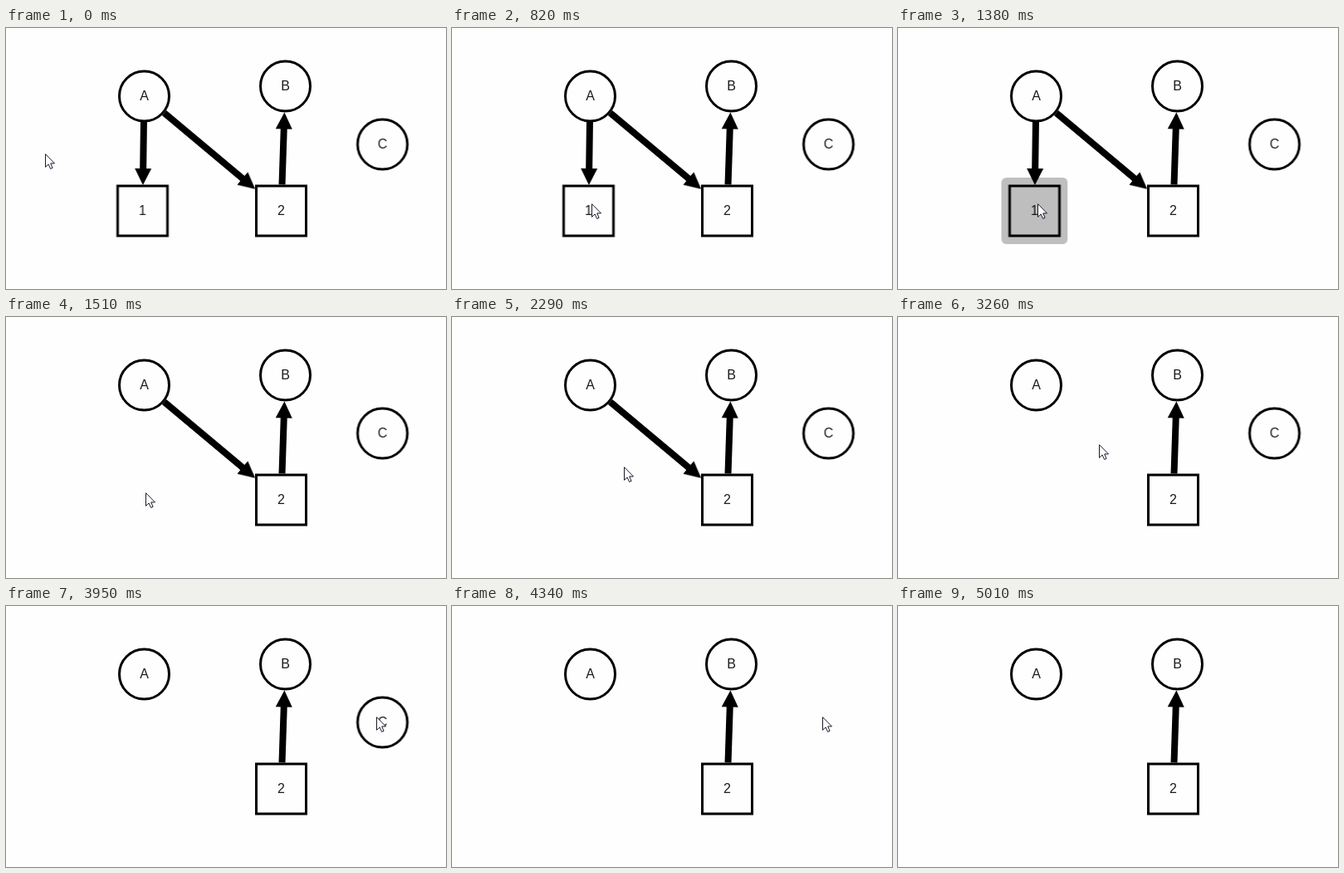
Recreate the animation shown at these times as an HTML page. Size 530 px wide and 314 px high, loop 5390 ms.

```html
<!DOCTYPE html>
<html lang="en">
<head>
<meta charset="utf-8">
<title>Deleting graph elements</title>
<style>
  html, body { margin: 0; width: 100%; height: 100%; overflow: hidden; background: #fefefe; }
  svg { display: block; width: 530px; height: 314px; }
  text { font: 16px "Liberation Sans", Arial, sans-serif; text-anchor: middle; fill: #1c1c1c; }
  .shape { fill: #fefefe; stroke: #000; stroke-width: 3; }
  .overlay { opacity: 0; }
  .overlay, .timed, .cursor { animation: 5390ms step-end infinite; }

  .node1 { animation-name: drop-node1; }
  .edge2 { animation-name: drop-edge2; }
  .nodeC { animation-name: drop-nodeC; }
  .node1 .overlay { animation-name: select-node1; }
  .edge2 .overlay { animation-name: select-edge2; }
  .nodeC .overlay { animation-name: select-nodeC; }
  .cursor { animation-name: move; }

  @keyframes drop-node1 { 0% { opacity: 1 } 28.014%, 100% { opacity: 0 } }
  @keyframes drop-edge2 { 0% { opacity: 1 } 60.482%, 100% { opacity: 0 } }
  @keyframes drop-nodeC { 0% { opacity: 1 } 80.519%, 100% { opacity: 0 } }
  @keyframes select-node1 { 0% { opacity: 0 } 25.602%, 100% { opacity: .25 } }
  @keyframes select-edge2 { 0% { opacity: 0 } 54.916%, 100% { opacity: .25 } }
  @keyframes select-nodeC { 0% { opacity: 0 } 78.293%, 100% { opacity: .25 } }

  @keyframes move {
    0% { transform: translate(47px, 151px) }
    10.204% { transform: translate(94px, 174px) }
    12.615% { transform: translate(138px, 194px) }
    15.213% { transform: translate(168px, 211px) }
    42.486% { transform: translate(207px, 180px) }
    45.083% { transform: translate(221px, 171px) }
    47.309% { transform: translate(236px, 159px) }
    49.721% { transform: translate(242px, 153px) }
    66.048% { transform: translate(283px, 149px) }
    68.274% { transform: translate(376px, 139px) }
    70.686% { transform: translate(443px, 133px) }
    73.283% { transform: translate(446px, 133px) }
    85.714% { transform: translate(450px, 153px) }
    88.311% { transform: translate(470px, 212px) }
    90.538% { transform: translate(498px, 298px) }
    92.949%, 100% { transform: translate(520px, 330px) }
  }
</style>
</head>
<body>
<svg viewBox="0 0 530 314">
  <defs>
    <circle id="round" class="shape" r="30"/>
    <rect id="square" class="shape" x="-30" y="-30" width="60" height="60"/>
    <rect id="glow" x="-40" y="-40" width="80" height="80" rx="6"/>
    <path id="head" d="M0 0L-20 -10V10Z"/>
  </defs>

  <!-- Edges: each group has its origin at the arrow tip, pointing along +x -->
  <g class="timed node1" transform="translate(164.9 189) rotate(90.8)">
    <path d="M-76 0H-15" stroke="#000" stroke-width="8"/>
    <use href="#head"/>
  </g>
  <g class="timed edge2" transform="translate(300.2 193.8) rotate(39.9)">
    <path class="overlay" d="M-143 0H-15" stroke="#000" stroke-width="28" stroke-linecap="round"/>
    <path d="M-143 0H-15" stroke="#000" stroke-width="8"/>
    <use href="#head"/>
  </g>
  <g transform="translate(335.4 101.5) rotate(-88.1)">
    <path d="M-87 0H-15" stroke="#000" stroke-width="8"/>
    <use href="#head"/>
  </g>

  <!-- Nodes -->
  <g transform="translate(166.5 82)"><use href="#round"/><text y="5">A</text></g>
  <g transform="translate(336.5 70)"><use href="#round"/><text y="5">B</text></g>
  <g class="timed nodeC" transform="translate(453.5 140)">
    <use href="#round"/><text y="5">C</text>
    <use class="overlay" href="#glow"/>
  </g>
  <g class="timed node1" transform="translate(164.5 220)">
    <use href="#square"/><text y="5">1</text>
    <use class="overlay" href="#glow"/>
  </g>
  <g transform="translate(331.5 220)"><use href="#square"/><text y="5">2</text></g>

  <path class="cursor" d="M.5 .7V16.3L4.1 12.9L6.6 18.4L9.1 17.3L6.7 11.9H11.5Z"
        fill="#fff" stroke="#1a1a2c"/>
</svg>
</body>
</html>
```
